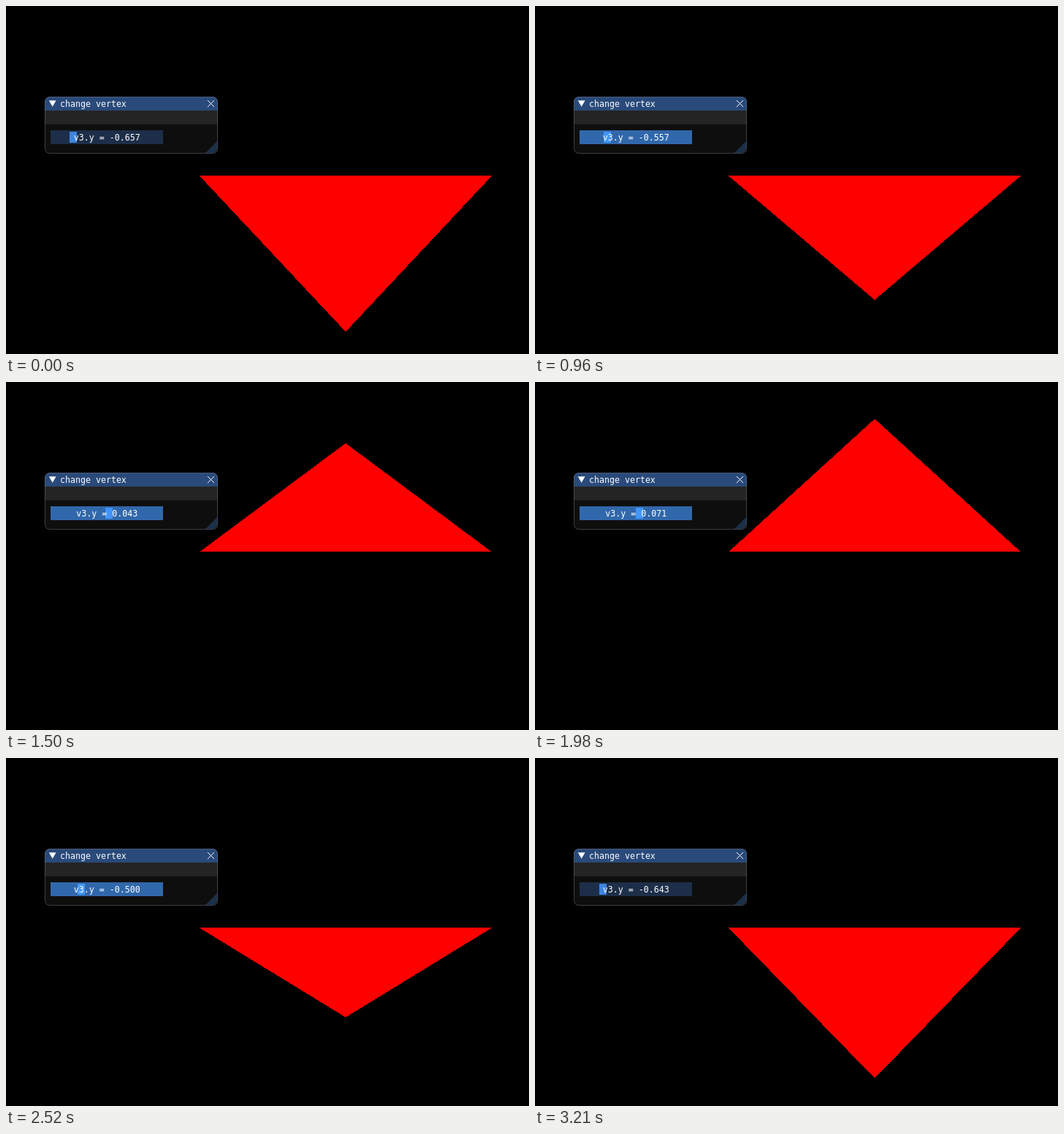
Animation, 716 px wide and 476 px high, one loop 3990 ms. Source, as an HTML page:

```html
<!DOCTYPE html>
<html lang="en">
<head>
<meta charset="utf-8">
<title>change vertex</title>
<style>
  html, body { margin: 0; width: 100%; height: 100%; overflow: hidden; background: #000; }
  svg { display: block; }
  text { font: 11.627px "DejaVu Sans Mono", "Liberation Mono", monospace; fill: #fff; white-space: pre; }
  .crisp { shape-rendering: crispEdges; }
</style>
</head>
<body>
<svg width="716" height="476" viewBox="0 0 716 476">
  <defs>
    <clipPath id="panel"><rect x="53" y="124" width="237" height="78" rx="7"/></clipPath>
  </defs>
  <polygon id="triangle" class="crisp" fill="#f00"/>

  <g clip-path="url(#panel)">
    <rect x="53" y="124" width="237" height="78" fill="#0e0e0e"/>
    <rect x="53" y="124" width="237" height="19" fill="#294a7a"/>
    <rect x="53" y="143" width="237" height="19" fill="#242424"/>
  </g>
  <path d="M273 201L289 185V194A7 7 0 0 1 282 201Z" fill="#1b3049"/>
  <rect x="53.5" y="124.5" width="236" height="77" rx="6.5" fill="none" stroke="#6e6e80" stroke-opacity=".5"/>
  <path d="M58.8 129.2H68.6L63.7 137.8Z" fill="#fff"/>
  <path d="M276 129L285 138M285 129L276 138" stroke="#fff"/>
  <text x="74" y="138">change vertex</text>

  <rect id="track" x="61" y="170" width="154" height="19"/>
  <rect id="grab" y="172" width="10" height="15"/>
  <text id="label" x="138.3" y="184" text-anchor="middle"></text>
</svg>
<script>
  const LOOP = 3990, TICK = 30;
  const PRESS = 480, RELEASE = 3090, LEAVE = 3210;

  // Key points of the drag: [ms, slider offset in pixels from its centre]
  const keys = [
    [450, -46], [PRESS, -47], [720, -47], [945, -39.5], [1230, -7.7], [1485, 2.1],
    [1620, 6], [1950, 6], [2265, -23.6], [2460, -33], [2835, -43.5], [2910, -45]
  ];

  const looks = {
    idle:   ["#1d2e48", "#3d85e0"],
    hover:  ["#23446c", "#3d85e0"],
    active: ["#3168ab", "#4296fa"]
  };

  const el = id => document.getElementById(id);
  const triangle = el("triangle"), track = el("track"), grab = el("grab"), label = el("label");

  const slope = i => (keys[i + 1][1] - keys[i][1]) / (keys[i + 1][0] - keys[i][0]);

  // Harmonic mean of the neighbouring slopes, so the curve never overshoots.
  function tangent(i) {
    if (i === 0 || i === keys.length - 1) return 0;
    const a = slope(i - 1), b = slope(i);
    return a * b > 0 ? 2 * a * b / (a + b) : 0;
  }

  function offsetAt(t) {
    const last = keys.length - 1;
    if (t <= keys[0][0]) return keys[0][1];
    if (t >= keys[last][0]) return keys[last][1];
    const i = keys.findIndex(([ms]) => ms > t) - 1;
    const [t0, a] = keys[i], [t1, b] = keys[i + 1];
    const d = t1 - t0, u = (t - t0) / d, v = 1 - u;
    return a + (b - a) * u * u * (3 - 2 * u)
      + d * u * v * (v * tangent(i) - u * tangent(i + 1));
  }

  function lookAt(t) {
    if (t < PRESS || t >= LEAVE) return looks.idle;
    return t < RELEASE ? looks.active : looks.hover;
  }

  function draw(time) {
    const t = Math.floor((time % LOOP) / TICK) * TICK;
    const n = Math.round(offsetAt(t));
    // The shape follows the slider one tick late.
    const apex = 96 - 7.6 * offsetAt(t - TICK);
    const [bg, knob] = lookAt(t);

    triangle.setAttribute("points", `265,232.4 665,232.4 465,${apex.toFixed(2)}`);
    track.setAttribute("fill", bg);
    grab.setAttribute("fill", knob);
    grab.setAttribute("x", 133 + n);
    label.textContent = "v3.y = " + ((n || 0) / 70).toFixed(3);
  }

  const start = performance.now();
  function loop() {
    draw(performance.now() - start);
    requestAnimationFrame(loop);
  }
  loop();
</script>
</body>
</html>
```
